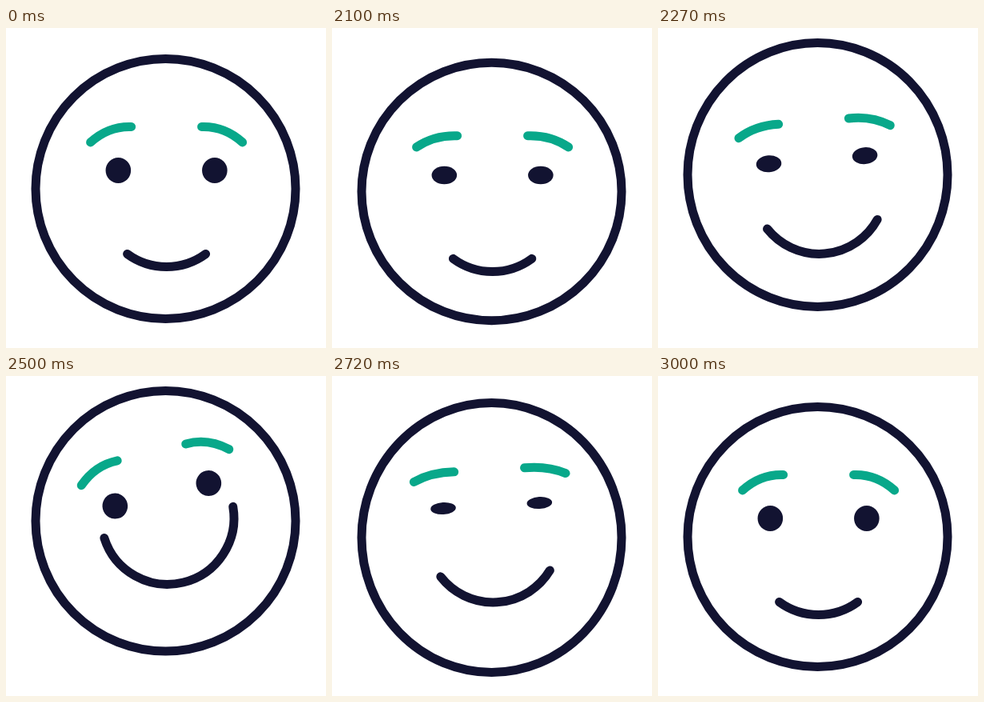
An HTML page that plays this animation: 400x400 px, repeating every 3.52 s.

```html
<!DOCTYPE html>
<html lang="en">
<head>
<meta charset="utf-8">
<title>Smiling face</title>
<style>
  html, body { margin: 0; width: 100%; height: 100%; overflow: hidden; background: #fff; }
  svg { display: block; width: 100%; height: 100%; }
  .line { fill: none; stroke: #121331; stroke-width: 11; stroke-linecap: round; }
  .brow { stroke: #08a88a; }
  .eye { fill: #121331; }
</style>
</head>
<body>
<svg viewBox="0 0 400 400">
  <ellipse id="ring" class="line" cx="199.5" rx="162.5"/>
  <g id="face">
    <path class="line brow"/>
    <path class="line brow" transform="scale(-1 1)"/>
    <ellipse class="eye" cx="-60.25" cy="-24.3" rx="15.8"/>
    <ellipse class="eye" cx="60.25" cy="-24.3" rx="15.8"/>
    <path id="mouth" class="line"/>
  </g>
</svg>
<script>
const LOOP = 3520, START = 2020, STEPS = 40;
const PIVOT = { x: 200.6, y: 202.3 };

// Each track is a list of [step, value]; one step lasts 25 ms.
const tracks = {
  top:   [[0, 38.5], [1, 41.5], [3, 46.5], [7, 22.5], [9.5, 18.5], [21, 18.5], [29, 33.5], [33, 42.5], [40, 38.5]],
  base:  [[0, 363.5], [1, 364.5], [3, 366], [7, 363], [13, 344], [21, 344], [28, 371.3], [29, 370.5], [33, 363.5], [40, 363.5]],
  shift: [[1, 0], [4, 6], [7, 2.5], [16, -30.4], [21, -30.4], [29, -16], [33, 6.5], [40, 0]],
  tilt:  [[7, 0], [17, -13.7], [21, -13.7], [29, -3.3], [32, 0]],
  blink: [[1, 0], [7, 1], [8, 1.05], [14, 0], [23, 0], [29, .81], [31, 1.05], [33, .67], [37, 0]],
  smile: [[3, 36.2], [7, 38.2], [17, 86], [21, 86], [29, 55.5], [33, 39.2], [37, 36.2]],
  lip:   [[7, 13.2], [17, 5.6], [21, 5.6], [29, 13.7], [33, 13.7], [40, 13.2]]
};

const slope = (a, b) => (b[1] - a[1]) / (b[0] - a[0]);

// Monotone cubic interpolation: smooth, never past a key value.
function sample(keys, u) {
  const last = keys.length - 1;
  if (u <= keys[0][0]) return keys[0][1];
  if (u >= keys[last][0]) return keys[last][1];
  const tangent = i => {
    if (i === 0 || i === last) return 0;
    const a = slope(keys[i - 1], keys[i]), b = slope(keys[i], keys[i + 1]);
    return a * b > 0 ? 2 * a * b / (a + b) : 0;
  };
  const i = keys.findIndex(k => k[0] > u) - 1;
  const [x0, y0] = keys[i], [x1, y1] = keys[i + 1];
  const h = x1 - x0, p = (u - x0) / h, q = 1 - p;
  return y0 * q * q * (1 + 2 * p) + y1 * p * p * (3 - 2 * p)
    + h * p * q * (tangent(i) * q - tangent(i + 1) * p);
}

const ring = document.getElementById('ring');
const face = document.getElementById('face');
const mouth = document.getElementById('mouth');
const brows = document.querySelectorAll('.brow');
const eyes = document.querySelectorAll('.eye');

// Steps alternate between 30 and 20 ms on screen.
function stepAt(ms) {
  const t = ms - START;
  if (t < 0) return 0;
  return Math.min(STEPS, 1 + 2 * Math.floor(t / 50) + (t % 50 >= 30 ? 1 : 0));
}

function draw(ms) {
  const u = stepAt(ms), pose = {};
  for (const name in tracks) pose[name] = sample(tracks[name], u);

  ring.setAttribute('cy', (pose.top + pose.base) / 2);
  ring.setAttribute('ry', (pose.base - pose.top) / 2);
  face.setAttribute('transform',
    `translate(${PIVOT.x} ${PIVOT.y + pose.shift}) rotate(${pose.tilt})`);

  const inner = -78.8 + 12 * pose.blink;
  for (const brow of brows) {
    brow.setAttribute('d', `M-95 -59.4Q-72.5 ${inner - 1} -44 ${inner}`);
  }
  for (const eye of eyes) eye.setAttribute('ry', 16 - 10.5 * pose.blink);

  const r = 83, angle = pose.smile * Math.PI / 180;
  const x = r * Math.sin(angle), y = pose.lip + r * Math.cos(angle);
  mouth.setAttribute('d', `M${-x} ${y}A${r} ${r} 0 0 0 ${x} ${y}`);
}

const origin = performance.now();
function tick() {
  draw((performance.now() - origin) % LOOP);
  requestAnimationFrame(tick);
}
tick();
</script>
</body>
</html>
```
